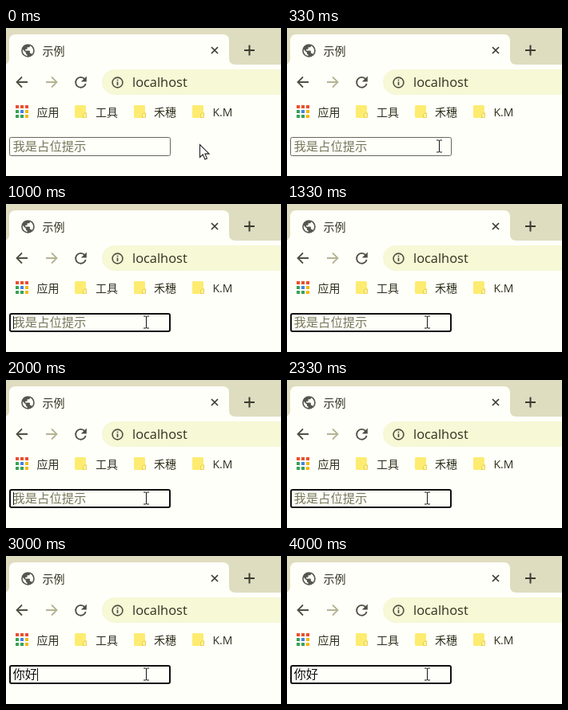
An HTML page for the animation above (4.33 s loop, 344 by 186 pixels).

```html
<!DOCTYPE html>
<html lang="zh-CN">
<head>
<meta charset="utf-8">
<title>示例</title>
<style>
html, body { margin: 0; width: 100%; height: 100%; overflow: hidden; background: #fffffa; }
svg { display: block; width: 100vw; height: 100vh; }
text { font-family: "Open Sans", "Noto Sans CJK SC", "Noto Sans CJK", sans-serif; fill: #30301f; }
.label { font-size: 14px; }
.field { font-size: 15.3px; fill: #111; }
.stroke { fill: none; stroke: #4f4f42; stroke-width: 1.8; }
.hidden { display: none; }
#hint { fill: #77775c; }
#candidates text { font-size: 17px; fill: #1c1c1c; }
#candidates .num { font-size: 10px; fill: #85857a; }
#candidates .chosen { fill: #fff; }
#candidates .num.chosen { fill: #b5dcec; }
</style>
</head>
<body>
<svg viewBox="0 0 344 186">
  <defs>
    <g id="folder">
      <path d="M1.5 0H12.5Q14 0 14 1.5V9L15 10V15Q15 16 14 16H1.5Q0 16 0 14.5V1.5Q0 0 1.5 0Z" fill="#fdec70"/>
      <path d="M10.5 15.5V11.5L12 10H14.5V14.5Q14.5 15.5 13.5 15.5Z" fill="#fdf3a0" stroke="#e6cf4e"/>
    </g>
  </defs>
  <rect width="344" height="186" fill="#fffffa"/>

  <!-- tab strip -->
  <rect width="344" height="46" fill="#dfddc0"/>
  <path d="M-4 46Q4 46 4 38V16Q4 8 12 8H271Q279 8 279 16V38Q279 46 287 46Z" fill="#fffffa"/>
  <path transform="translate(17.5 18.5) scale(.83)" fill="#55564c" d="M12 2a10 10 0 1 0 0 20a10 10 0 1 0 0-20ZM11 19.9C7 19.4 4 16 4 12L4.2 10.2L9 15V16Q9 18 11 18ZM17.9 17.4Q17.4 16 16 16H15V13Q15 12 14 12H8V10H10Q11 10 11 9V7H13Q15 7 15 5V4.6C18 5.8 20 8.7 20 12Q20 15.2 17.9 17.4Z"/>
  <text class="label" x="45.5" y="33.5">示例</text>
  <path class="stroke" d="M257 24L265 32M265 24L257 32" style="stroke:#3b3b32;stroke-width:1.7"/>
  <path class="stroke" d="M298 28H311M304.5 21.5V34.5" style="stroke:#3b3b32;stroke-width:2"/>

  <!-- toolbar -->
  <path class="stroke" d="M27 68H14M20 61.5L13.5 68L20 74.5"/>
  <path class="stroke" d="M50 68H63M57 61.5L63.5 68L57 74.5" style="stroke:#b4b492"/>
  <path class="stroke" d="M98.4 64.2A6.4 6.4 0 1 0 99.7 70"/>
  <path d="M100.8 60.5V67.5H93.8Z" fill="#4f4f42"/>
  <path d="M344 52H136A16 16 0 0 0 136 84H344Z" fill="#f6f8d6"/>
  <circle class="stroke" cx="139.5" cy="68.5" r="6.4" style="stroke-width:1.6"/>
  <path class="stroke" d="M139.5 67.5V72M139.5 64.7V66.3" style="stroke-width:1.7"/>
  <text x="158" y="74" font-size="16.4">localhost</text>

  <!-- bookmarks -->
  <g id="apps"></g>
  <use href="#folder" x="86" y="97"/>
  <use href="#folder" x="160" y="97"/>
  <use href="#folder" x="233" y="97"/>
  <g>
    <text class="label" x="38.5" y="111">应用</text>
    <text class="label" x="112" y="111">工具</text>
    <text class="label" x="185" y="111">禾穗</text>
    <text class="label" x="258.5" y="111">K.M</text>
  </g>

  <!-- input -->
  <rect id="plain" x="4.5" y="137.5" width="201" height="23" rx="2" fill="#fffffa" stroke="#66665a"/>
  <rect id="focused" x="5" y="138" width="200" height="22" rx="2" fill="#fffffa" stroke="#111" stroke-width="2"/>
  <text id="hint" class="field" x="8.5" y="154">我是占位提示</text>
  <g id="typing">
    <text class="field" x="8.5" y="154" style="font-size:14px">ni'h</text>
    <path d="M9 157.5H33" stroke="#222" stroke-dasharray="1 1"/>
  </g>
  <text id="done" class="field" x="8.5" y="154">你好</text>
  <rect id="caret" y="141" width="1" height="16" fill="#111"/>

  <g id="candidates">
    <rect x="5" y="161" width="339" height="25" fill="#fffffa"/>
    <path d="M206 160.5H344" stroke="#397d68"/>
    <rect x="5" y="161" width="81" height="25" fill="#0a76c2"/>
  </g>

  <path id="arrow" d="M0 0V16L3.8 12.5L6.4 18.5L9 17.4L6.4 11.6H11.6Z" fill="#fff" stroke="#222" stroke-width="1.1"/>
  <path id="beam" d="M-3.5 -7.5H-1Q0 -7.5 0 -6.5V6.5Q0 7.5 -1 7.5H-3.5M3.5 -7.5H1Q0 -7.5 0 -6.5V6.5Q0 7.5 1 7.5H3.5" fill="none" stroke="#151515"/>
</svg>
<script>
const LOOP = 4330;
const $ = id => document.getElementById(id);

function add(parent, tag, attrs, content = '') {
  const node = document.createElementNS('http://www.w3.org/2000/svg', tag);
  for (const key in attrs) node.setAttribute(key, attrs[key]);
  node.textContent = content;
  $(parent).append(node);
}

const [red, green, blue, yellow] = ['#e8502f', '#36a45a', '#4285e8', '#f5b90f'];
[red, red, red, green, blue, yellow, green, green, yellow].forEach((fill, i) =>
  add('apps', 'rect', { x: 12 + i % 3 * 6, y: 97 + Math.floor(i / 3) * 6, width: 4, height: 4, fill }));

[['你哈', 24], ['你', 105.5], ['尼', 168], ['拟', 229.5], ['妮', 291.5]].forEach(([word, x], i) => {
  const chosen = i ? '' : 'chosen';
  add('candidates', 'text', { x, y: 189, class: 'num ' + chosen }, i + 1);
  add('candidates', 'text', { x: x + 9, y: 189.5, class: chosen }, word);
});

// start time, pointer shape, pointer x, pointer y, focus, content, caret x
const steps = [
  [0, 'arrow', 242.5, 146.5, false, 'hint', 0],
  [330, 'beam', 190.5, 148.5, false, 'hint', 0],
  [670, 'beam', 178.5, 148.5, false, 'hint', 0],
  [1000, 'beam', 175.5, 148.5, true, 'hint', 9],
  [1330, 'beam', 175.5, 148.5, true, 'hint', 0],
  [2000, 'beam', 175.5, 148.5, true, 'hint', 9],
  [2330, 'beam', 175.5, 148.5, true, 'hint', 0],
  [2670, 'beam', 175.5, 148.5, true, 'typing', 33],
  [3000, 'beam', 175.5, 148.5, true, 'done', 39],
  [3670, 'beam', 175.5, 148.5, true, 'done', 0]
];

const show = (id, visible) => $(id).classList.toggle('hidden', !visible);

function render(time) {
  const [, pointer, x, y, focus, content, caretX] = steps.findLast(step => step[0] <= time);
  for (const id of ['arrow', 'beam']) show(id, id === pointer);
  for (const id of ['hint', 'typing', 'done']) show(id, id === content);
  show('plain', !focus);
  show('focused', focus);
  show('candidates', content === 'typing');
  show('caret', caretX > 0);
  $('caret').setAttribute('x', caretX);
  $(pointer).setAttribute('transform', `translate(${x} ${y})`);
}

const start = performance.now();
function tick() {
  render((performance.now() - start) % LOOP);
  requestAnimationFrame(tick);
}
tick();
</script>
</body>
</html>
```
